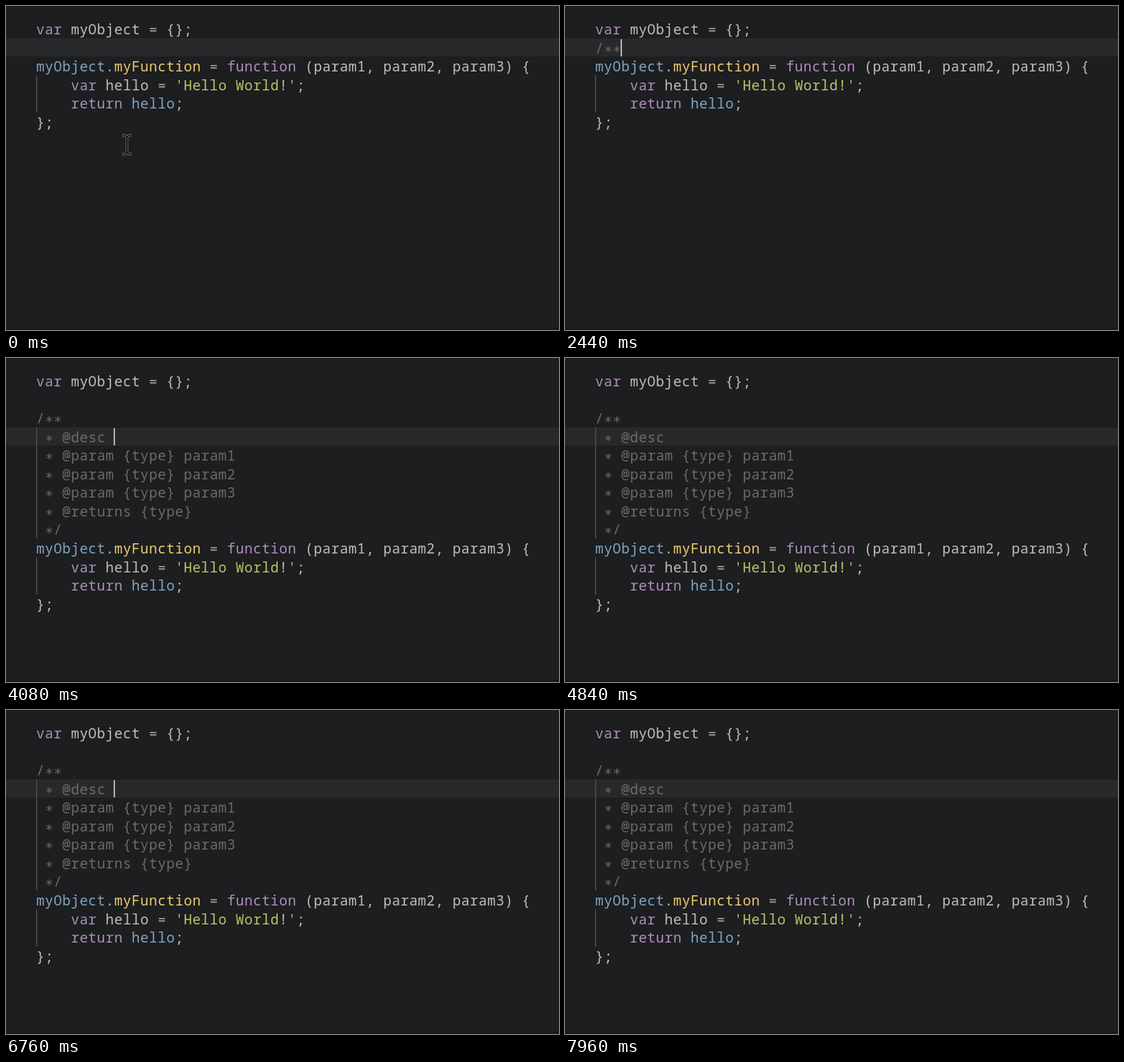
These frames come from a looping animation (700 px wide and 411 px high, 8 s). An HTML page with a canvas:

```html
<!DOCTYPE html>
<html lang="en">
<head>
<meta charset="utf-8">
<title>Doc comment typing</title>
<style>
  html, body { margin: 0; width: 100%; height: 100%; overflow: hidden; background: #1c1e20; }
  canvas { display: block; width: 700px; height: 411px; }
</style>
</head>
<body>
<canvas id="stage"></canvas>
<script>
const W = 700, H = 411, LOOP = 8000;
const LEFT = 38, ADVANCE = 10.98, LINE = 23.55, BASE = 36, TOP = 17.5;
const COLOR = {
  back: '#1c1e20', row: '#28292b', edge: '#1a1a1d', guide: '#4b4d4f', caret: '#d2d4d2',
  text: '#bfc1bf', op: '#a9abaa', key: '#b08fba', name: '#84a5c0',
  func: '#f0cb70', str: '#b9c967', note: '#6b6c6c', regex: '#8abeb7'
};

// Each line is a list of [color, text] runs.
const HEAD = [['key', 'var'], ['text', ' myObject '], ['op', '='], ['text', ' {};']];
const BODY = [
  [['name', 'myObject'], ['text', '.'], ['func', 'myFunction'], ['op', ' = '], ['key', 'function'],
   ['text', ' (param1, param2, param3) {']],
  [['key', '    var'], ['text', ' hello '], ['op', '= '], ['str', "'Hello World!'"], ['text', ';']],
  [['key', '    return '], ['name', 'hello'], ['text', ';']],
  [['text', '};']]
];
const DOC = ['/**', ' * @desc', ' * @param {type} param1', ' * @param {type} param2',
  ' * @param {type} param3', ' * @returns {type}', ' */'].map(s => [['note', s]]);

// Key presses: time, typed text, its color.
const KEYS = [
  { at: 720, text: '/', color: 'regex' },
  { at: 1320, text: '/*', color: 'note' },
  { at: 1920, text: '/**', color: 'note' }
];
const IDLE = { at: -740, text: '', color: 'note' };
const EXPAND = 2960, BLINK = 1100;

const canvas = document.getElementById('stage');
const ctx = canvas.getContext('2d');
const ratio = window.devicePixelRatio || 1;
canvas.width = W * ratio;
canvas.height = H * ratio;
ctx.scale(ratio, ratio);

// Space the letters evenly on the editor's character grid.
ctx.font = '17.5px "Noto Sans Mono", "DejaVu Sans Mono", monospace';
const spacing = ADVANCE - ctx.measureText('m').width;
ctx.letterSpacing = `${spacing}px`;

function rect(color, x, y, w, h) {
  ctx.fillStyle = COLOR[color];
  ctx.fillRect(x, y, w, h);
}

function drawLine(runs, row) {
  let x = LEFT + spacing / 2;
  for (const [color, text] of runs) {
    ctx.fillStyle = COLOR[color];
    // The editor's asterisk sits at mid-height.
    ctx.fillText(text.replace(/\*/g, '\u2217'), x, BASE + row * LINE);
    x += text.length * ADVANCE;
  }
}

const drawLines = (lines, row) => lines.forEach((runs, i) => drawLine(runs, row + i));

const rowTop = row => Math.round(TOP + row * LINE);

function drawGuide(from, to) {
  rect('guide', 38, rowTop(from), 1.4, rowTop(to) - rowTop(from));
}

function drawCaret(row, col, since) {
  if (since % BLINK < BLINK / 2) rect('caret', LEFT + col * ADVANCE - 0.4, rowTop(row) + 1, 1.5, 22);
}

function drawPointer(x, y) {
  const beam = new Path2D(`M${x - 4} ${y - 12}q3 0 4 3q1-3 4-3M${x} ${y - 9}V${y + 9}` +
    `M${x - 4} ${y + 12}q3 0 4-3q1 3 4 3`);
  ctx.lineCap = 'square';
  for (const [color, width] of [['#7c7d7e', 3], ['#0b0c0d', 1.6]]) {
    ctx.strokeStyle = color;
    ctx.lineWidth = width;
    ctx.stroke(beam);
  }
}

function draw(t) {
  const expanded = t >= EXPAND;
  const row = expanded ? 3 : 1;
  const bodyRow = expanded ? 9 : 2;

  rect('back', 0, 0, W, H);
  rect('edge', 0, 407, W, 4);
  rect('row', 0, rowTop(row), W, 23);

  if (expanded) drawGuide(3, 9);
  drawGuide(bodyRow + 1, bodyRow + 3);

  drawLine(HEAD, 0);
  drawLines(BODY, bodyRow);

  if (expanded) {
    drawLines(DOC, 2);
    drawCaret(3, 9, t - EXPAND);
  } else {
    const key = KEYS.filter(k => t >= k.at).pop() || IDLE;
    drawLine([[key.color, key.text]], 1);
    drawCaret(1, key.text.length, t - key.at);
    if (key === IDLE) drawPointer(153, 176);
  }
}

function frame() {
  draw(performance.now() % LOOP);
  requestAnimationFrame(frame);
}
frame();
</script>
</body>
</html>
```
